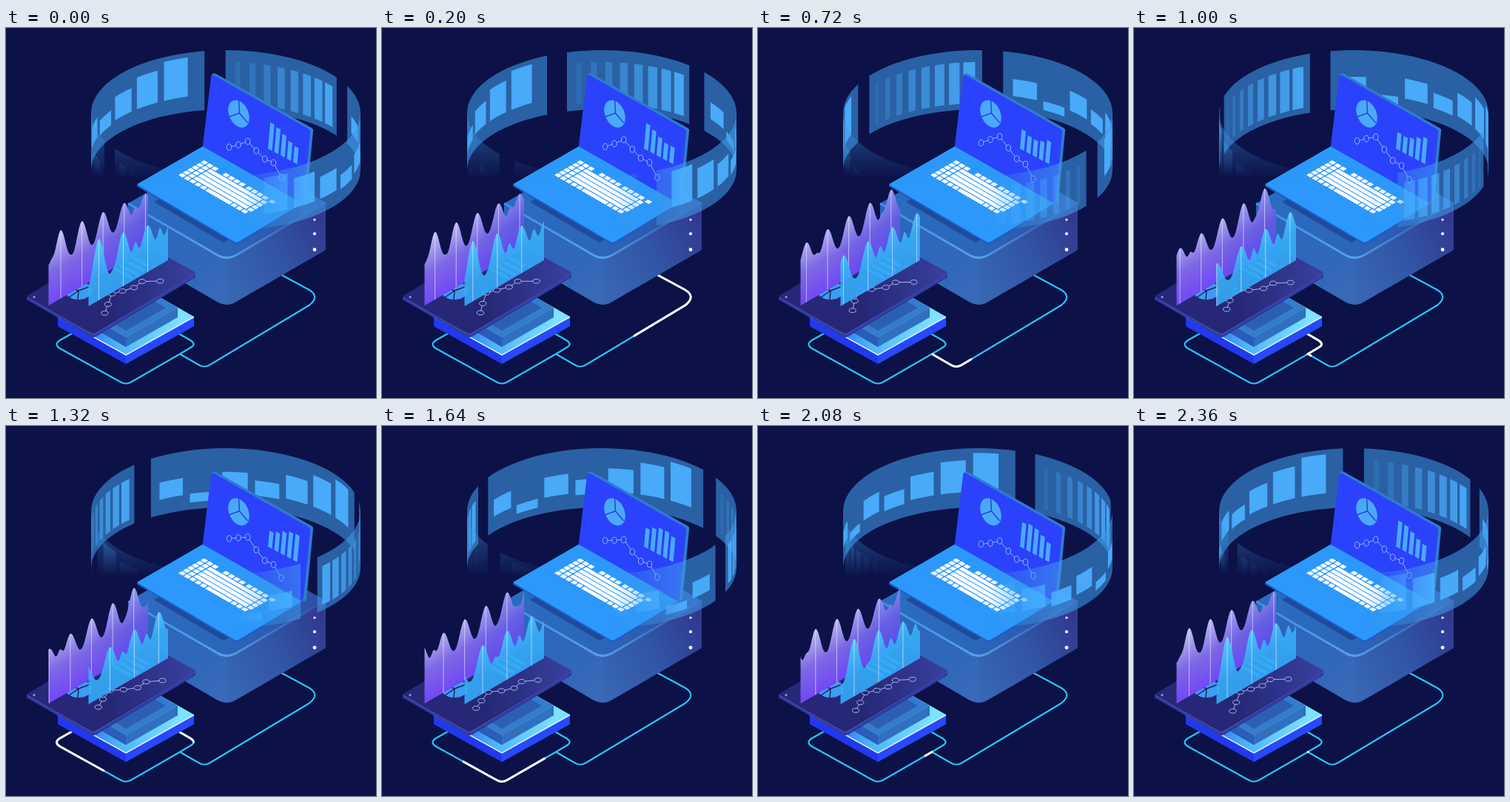
An HTML page that plays this animation: 500x500 px, repeating every 2.4 s.

```html
<!DOCTYPE html>
<html lang="en">
<head>
<meta charset="utf-8">
<title>Data scene</title>
<style>
html, body { margin: 0; width: 100%; height: 100%; overflow: hidden; background: #0c1248; }
svg { display: block; width: 100vw; height: 100vh; }
</style>
</head>
<body>
<svg viewBox="0 0 500 500" xmlns="http://www.w3.org/2000/svg">
<defs>
  <linearGradient id="boxL" x1="165" y1="250" x2="298" y2="370" gradientUnits="userSpaceOnUse">
    <stop offset="0" stop-color="#2a65bd"/><stop offset=".6" stop-color="#2f67ba"/><stop offset="1" stop-color="#3a6ab6"/>
  </linearGradient>
  <linearGradient id="boxR" x1="298" y1="340" x2="432" y2="270" gradientUnits="userSpaceOnUse">
    <stop offset="0" stop-color="#3766b3"/><stop offset=".5" stop-color="#3155a5"/><stop offset="1" stop-color="#323a90"/>
  </linearGradient>
  <linearGradient id="boxT" x1="165" y1="237" x2="432" y2="237" gradientUnits="userSpaceOnUse">
    <stop offset="0" stop-color="#2b6cc2"/><stop offset=".5" stop-color="#2b66b8"/><stop offset="1" stop-color="#2f4da2"/>
  </linearGradient>
  <linearGradient id="rim" x1="165" y1="0" x2="432" y2="0" gradientUnits="userSpaceOnUse">
    <stop offset="0" stop-color="#3f8fe6"/><stop offset=".5" stop-color="#56a0ee"/><stop offset="1" stop-color="#3c62b8" stop-opacity=".3"/>
  </linearGradient>
  <linearGradient id="plate" x1="100" y1="390" x2="235" y2="400" gradientUnits="userSpaceOnUse">
    <stop offset="0" stop-color="#2b62e8"/><stop offset=".4" stop-color="#4db4fb"/><stop offset="1" stop-color="#7de2ff"/>
  </linearGradient>
  <linearGradient id="phone" x1="40" y1="360" x2="250" y2="330" gradientUnits="userSpaceOnUse">
    <stop offset="0" stop-color="#28287a"/><stop offset=".45" stop-color="#252775"/><stop offset="1" stop-color="#383f9c"/>
  </linearGradient>
  <linearGradient id="violet" x1="125" y1="337" x2="88" y2="272" gradientUnits="userSpaceOnUse">
    <stop offset="0" stop-color="#7347f6"/><stop offset=".5" stop-color="#7d68e4"/><stop offset="1" stop-color="#bab6f0"/>
  </linearGradient>
  <linearGradient id="shade" x1="100" y1="330" x2="190" y2="345" gradientUnits="userSpaceOnUse">
    <stop offset="0" stop-color="#4048e0" stop-opacity="0"/><stop offset="1" stop-color="#4050e0" stop-opacity=".55"/>
  </linearGradient>
  <linearGradient id="cyan" x1="165" y1="345" x2="132" y2="288" gradientUnits="userSpaceOnUse">
    <stop offset="0" stop-color="#35acfb" stop-opacity=".88"/><stop offset=".5" stop-color="#36acf5" stop-opacity=".92"/><stop offset="1" stop-color="#50c4f8"/>
  </linearGradient>
  <linearGradient id="fadeX" x1="308" y1="0" x2="405" y2="0" gradientUnits="userSpaceOnUse">
    <stop offset="0" stop-color="#fff" stop-opacity="0"/><stop offset=".5" stop-color="#fff" stop-opacity=".6"/><stop offset="1" stop-color="#fff"/>
  </linearGradient>
  <linearGradient id="fadeY" x1="0" y1="125" x2="0" y2="203" gradientUnits="userSpaceOnUse">
    <stop offset="0" stop-color="#fff" stop-opacity=".8"/><stop offset="1" stop-color="#fff" stop-opacity="0"/>
  </linearGradient>
  <mask id="fade" maskUnits="userSpaceOnUse" x="0" y="0" width="500" height="500">
    <rect x="300" width="200" height="500" fill="url(#fadeX)"/>
    <rect width="220" height="500" fill="url(#fadeY)"/>
  </mask>
  <path id="cable" pathLength="1" d="M372 333L409 353Q425 362 410 374L275 455Q268 459 261 455L235 440"/>
  <path id="loop" pathLength="1" d="M235 440L250 431Q257 427 250 422L169 375Q162 371 155 375L72 422Q65 427 72 432L155 478Q162 482 169 478L235 440"/>
</defs>

<g id="back"></g>

<g fill="none" stroke="#2cc3f2" stroke-width="2.2" transform="translate(0 .5)">
  <use href="#cable"/><use href="#loop"/>
  <g stroke="#fff" stroke-width="3" stroke-linecap="round">
    <use id="lightA" href="#cable"/><use id="lightB" href="#loop"/>
  </g>
</g>

<!-- server box -->
<path d="M165 237H300V374Q292 374 285 370L165 300Z" fill="url(#boxL)"/>
<path d="M298 237H432V300L311 370Q305 374 298 374Z" fill="url(#boxR)"/>
<path d="M165 237L298 160L432 236L311 307Q298 314 286 307Z" fill="url(#boxT)"/>
<path d="M200 235L300 178L396 234L294 290Z" fill="#1b3f8a" opacity=".7"/>
<path d="M165 237L286 307Q298 314 311 307L432 236" fill="none" stroke="url(#rim)" stroke-width="3"/>
<g fill="#fff"><circle cx="417" cy="259" r="1.6"/><circle cx="417" cy="278" r="2.1"/><circle cx="417" cy="299.500" r="2.4"/></g>

<!-- laptop -->
<path d="M177 212L310 289Q312 290 314 289L400 238V240L314 292Q312 293 310 292L177 214Z" fill="#1b5fc8"/>
<path d="M264 161Q266 159 269 161L400 237L314 289Q312 290 309 289L179 213Q176 211 179 210Z" fill="#2c98fb"/>
<path d="M278 63Q280 60 284 62L413 135Q416 137 415 140L406 234Q405 238 401 236L266 160Z" fill="#2f7bd0"/>
<path d="M277 67Q277 62 281 64L408 136Q412 138 411 142L402 232Q401 237 398 235L266 160Z" fill="#2b42fc"/>
<g id="keys" fill="#fff" transform="matrix(.866 .5 .866 -.5 232.500 199)"></g>
<g transform="translate(314.500 116)">
  <ellipse rx="13" ry="19.500" transform="rotate(-24)" fill="#4aa9f9"/>
  <path d="M0 -19L1 -1L-13 4M1 -1L12 12" fill="none" stroke="#2446d8" stroke-width="1.500"/>
</g>
<path id="bars" fill="#4aa9f9"/>
<path id="net" fill="none" stroke="#8fb4ff" stroke-width="1"/>

<!-- plate -->
<path d="M70 390L162 442V454L70 403Z" fill="#2238ee"/>
<path d="M162 442L254 390V403L162 454Z" fill="#2848fb"/>
<path d="M70 390L162 338L254 390L162 442Z" fill="url(#plate)"/>
<path d="M70 390.500L162 442L254 390.500" fill="none" stroke="#d8f6ff" stroke-width="1.500"/>
<path d="M110 388L162 418V431L110 401Z" fill="#2a5cb8"/>
<path d="M162 418L232 378V391L162 431Z" fill="#3070be"/>
<path d="M92 378L162 338L232 378L162 418Z" fill="#357ccc"/>
<path d="M120 385L162 409L216 378L174 354Z" fill="#2c5fb2"/>

<!-- phone -->
<path d="M28 363L114 413Q118 415 122 413L256 333V337L122 417Q118 419 114 417L28 367Z" fill="#2d3c9e"/>
<path d="M30 361L160 284Q166 280 172 284L254 329Q258 331.500 254 334L122 412Q118 415 114 412L30 365Q27 363 30 361Z" fill="url(#phone)"/>
<path d="M29 364L114 413Q118 415 122 412L256 333" fill="none" stroke="#4a4fb4" stroke-width="1"/>
<circle cx="38" cy="363.500" r="1.500" fill="#8d98f0"/>
<ellipse cx="98" cy="355" rx="18" ry="12" fill="#3d9df2"/>
<path d="M98 355L114 349M98 355L85 364M98 355L97 367M98 355L84 349" stroke="#211f66" stroke-width="1.500"/>
<path d="M146 325l24 13M154 320l25 14M163 315l24 13M171 310l22 12" stroke="#3f9cf0" stroke-width="4"/>
<path id="web" fill="none" stroke="#a9b6ee" stroke-width="1"/>

<g id="charts"></g>
<g id="front" mask="url(#fade)"></g>
</svg>
<script>
const NS = 'http://www.w3.org/2000/svg', LOOP = 2400, TAU = 2 * Math.PI;
const $ = id => document.getElementById(id);
const rad = a => a * TAU / 360;
const clamp = x => Math.min(1, Math.max(0, x));
const fix = n => n.toFixed(2);
const poly = pts => 'M' + pts.map(p => fix(p[0]) + ' ' + fix(p[1])).join('L');

function add(parent, tag, attrs) {
  const el = document.createElementNS(NS, tag);
  for (const k in attrs) el.setAttribute(k, attrs[k]);
  return parent.appendChild(el);
}

// Keyboard: u runs along a row, rows stack towards the hinge
const ROW = 6.9, PITCH = 8.3;
function key(u, row, len = 6.6) {
  add($('keys'), 'rect', { x: u, y: row * ROW + .5, width: len, height: 5.6, rx: 1 });
}
function keys(u, row, count) {
  for (let i = 0; i < count; i++) key(u + i * PITCH, row);
}
keys(0, 0, 5);
key(5 * PITCH, 0, 38);
keys(81, 0, 3);
for (let row = 1; row < 5; row++) {
  keys(0, row, 2);
  key(2 * PITCH, row, 82);
  key(100, row);
}
keys(0, 5, 3);
keys(34, 5, 4);
keys(70, 5, 4);
keys(106, 5, 1);

// Ring: angle from the back, positive to the right; v runs down the band
const ring = (a, v) => {
  const c = Math.cos(rad(a));
  return [297 + 182 * Math.sin(rad(a)), 115 - 85 * c + (77 + 3 * c) * v];
};
function patch(a, b, v0, v1, mid) {
  let d = '';
  for (let k = -2; k <= 2; k++) {
    const lo = Math.max(a + 360 * k, mid - 90), hi = Math.min(b + 360 * k, mid + 90);
    if (lo >= hi) continue;
    const n = Math.ceil((hi - lo) / 4), up = [], down = [];
    for (let i = 0; i <= n; i++) {
      const ang = lo + (hi - lo) * i / n;
      up.push(ring(ang, v0));
      down.unshift(ring(ang, v1));
    }
    d += poly(up.concat(down)) + 'Z';
  }
  return d;
}
const SPLIT = 64.5, GAP = 4.5;
const tiles = [.45, .73, .4, .52, .34, .2, .08].map((top, i) => {
  const a = SPLIT + 8.8 + 14 * i;
  return [a, a + 10.9, top, .74 + .5 * Math.max(0, top - .45)];
});
const parts = [
  { fill: '#419ae7', alpha: .58, areas: [[GAP, SPLIT - GAP, 0, 1], [SPLIT + GAP, 180 - GAP, 0, 1]] },
  { fill: '#4bb0ff', alpha: .92, areas: tiles }
];
for (let i = 0; i < 8; i++) {
  const a = 8.6 + 6.2 * i;
  parts.push({ fill: '#4bb0ff', alpha: .15 + .1 * i, areas: [[a, a + 2.2 + .4 * i, .2, .9]] });
}
const sides = [['back', 0], ['front', 180]].map(([id, mid]) => ({
  mid, els: parts.map(p => add($(id), 'path', { fill: p.fill, 'fill-opacity': p.alpha }))
}));
function drawRing(p) {
  const turn = -4.6 - 178.5 * p;
  for (const s of sides) parts.forEach((part, i) => {
    let d = '';
    for (const [a, b, v0, v1] of part.areas)
      for (const half of [0, 180]) d += patch(a + turn + half, b + turn + half, v0, v1, s.mid);
    s.els[i].setAttribute('d', d);
  });
}

// Wave charts drifting left by one period per loop
const bell = (x, w) => Math.exp(-x * x / (w * w));
const waves = [
  {
    x0: 57.5, x1: 192, y0: 375, slope: .577, period: 28.6, peak: 74, fills: ['violet', 'shade'], low: 48, pow: 1.1,
    top: (u, c) => 83.5 + 10 * (1.1 - 2 * u) * c,
    bump: x => 17 * (bell(x - 70, 14) + bell(x - 175, 14)), off: 15, wide: 4.5
  },
  {
    x0: 111.5, x1: 219, y0: 376, slope: .58, period: 33, peak: 125.5, fills: ['cyan'], low: 26, pow: 1.2,
    top: (u, c) => 71 - 8 * u + 12 * (1.3 - 2 * u) * c,
    bump: x => 24 * clamp((x - 140) / 22), off: 16.5, wide: 4.5
  }
];
for (const w of waves) {
  w.els = w.fills.map(f => add($('charts'), 'path', { fill: `url(#${f})` }));
  w.lines = add($('charts'), 'path', { stroke: '#e4ecff', 'stroke-opacity': .65, 'stroke-width': 1 });
}
function drawWave(w, p) {
  const c = Math.cos(TAU * p), first = w.peak - w.period * p;
  const base = x => w.y0 - w.slope * (x - w.x0);
  const top = x => {
    const d = ((x - first) % w.period + w.period) % w.period;
    const crest = ((1 + Math.cos(TAU * d / w.period)) / 2) ** w.pow;
    const h = w.top((x - w.x0) / (w.x1 - w.x0), c);
    return base(x) - w.low - (h - w.low) * crest - w.bump(x) * bell(d - w.off, w.wide);
  };
  const pts = [[w.x0, base(w.x0)]];
  for (let x = w.x0; x < w.x1; x++) pts.push([x, top(x)]);
  pts.push([w.x1, top(w.x1)], [w.x1, base(w.x1)]);
  w.els.forEach(el => el.setAttribute('d', poly(pts) + 'Z'));
  let d = '';
  for (let x = first; x < w.x1; x += w.period)
    if (x > w.x0) d += poly([[x, top(x)], [x, base(x)]]);
  w.lines.setAttribute('d', d);
}

// Linked nodes, each swinging a little ahead of the one before
function chain(pts, rx, ry) {
  let d = '';
  pts.forEach(([x, y], i) => {
    d += `M${fix(x - rx)} ${fix(y)}a${rx} ${ry} 0 1 0 ${2 * rx} 0a${rx} ${ry} 0 1 0 ${-2 * rx} 0`;
    if (!i) return;
    const [px, py] = pts[i - 1], dx = x - px, dy = y - py, k = 1 / Math.hypot(dx / rx, dy / ry);
    d += poly([[px + dx * k, py + dy * k], [x - dx * k, y - dy * k]]);
  });
  return d;
}
const swing = (i, p) => 4.5 * (1 - (i / 7) ** 3) * Math.cos(TAU * p + .53 * i);
const sway = (pts, p, kx, ky) => pts.map(([x, y], i) => [x + kx * swing(i, p), y + ky * swing(i, p)]);
const NET = [[301.5, 156.5], [314, 154], [326.7, 151], [338.3, 166], [349.7, 179], [361.5, 184.5], [372, 203.5]];
const WEB = [[129, 382.5], [134, 371], [141, 358], [157.5, 355.5], [175, 352], [186.5, 344], [210, 343]];

function drawScreen(p) {
  let d = '';
  for (let i = 0; i < 5; i++) {
    const x = 354 + 8.5 * i, low = 163 + 4.5 * i;
    const h = 28.5 + 7 * Math.cos(TAU * p + .75 * i), lean = h * .09;
    d += poly([[x, low], [x + lean, low - h], [x + lean + 5.5, low - h + 3], [x + 5.5, low + 3]]) + 'Z';
  }
  $('bars').setAttribute('d', d);
  $('net').setAttribute('d', chain(sway(NET, p, 0, 1), 3.2, 4.2));
  $('web').setAttribute('d', chain(sway(WEB, p, 1, .6), 4.6, 2.9));
}

// Light running along the cable
const easeOut = (t, start, span) => 1 - (1 - clamp((t - start) / span)) ** 3;
function drawLight(el, from, to) {
  el.setAttribute('visibility', to > from ? 'visible' : 'hidden');
  el.setAttribute('stroke-dasharray', `${to - from} 2`);
  el.setAttribute('stroke-dashoffset', -from);
}

function draw(now) {
  const t = Math.floor(now % LOOP / 40 + 1e-6) * 40 % LOOP, p = t / LOOP;
  drawRing(p);
  drawScreen(p);
  waves.forEach(w => drawWave(w, p));
  drawLight($('lightA'), easeOut(t, 400, 808), easeOut(t, 0, 853));
  drawLight($('lightB'), easeOut(t, 1300, 1100), easeOut(t, 950, 1050));
}
let start;
function tick(now) {
  start ??= now;
  draw(now - start);
  requestAnimationFrame(tick);
}
draw(0);
requestAnimationFrame(tick);
</script>
</body>
</html>
```
